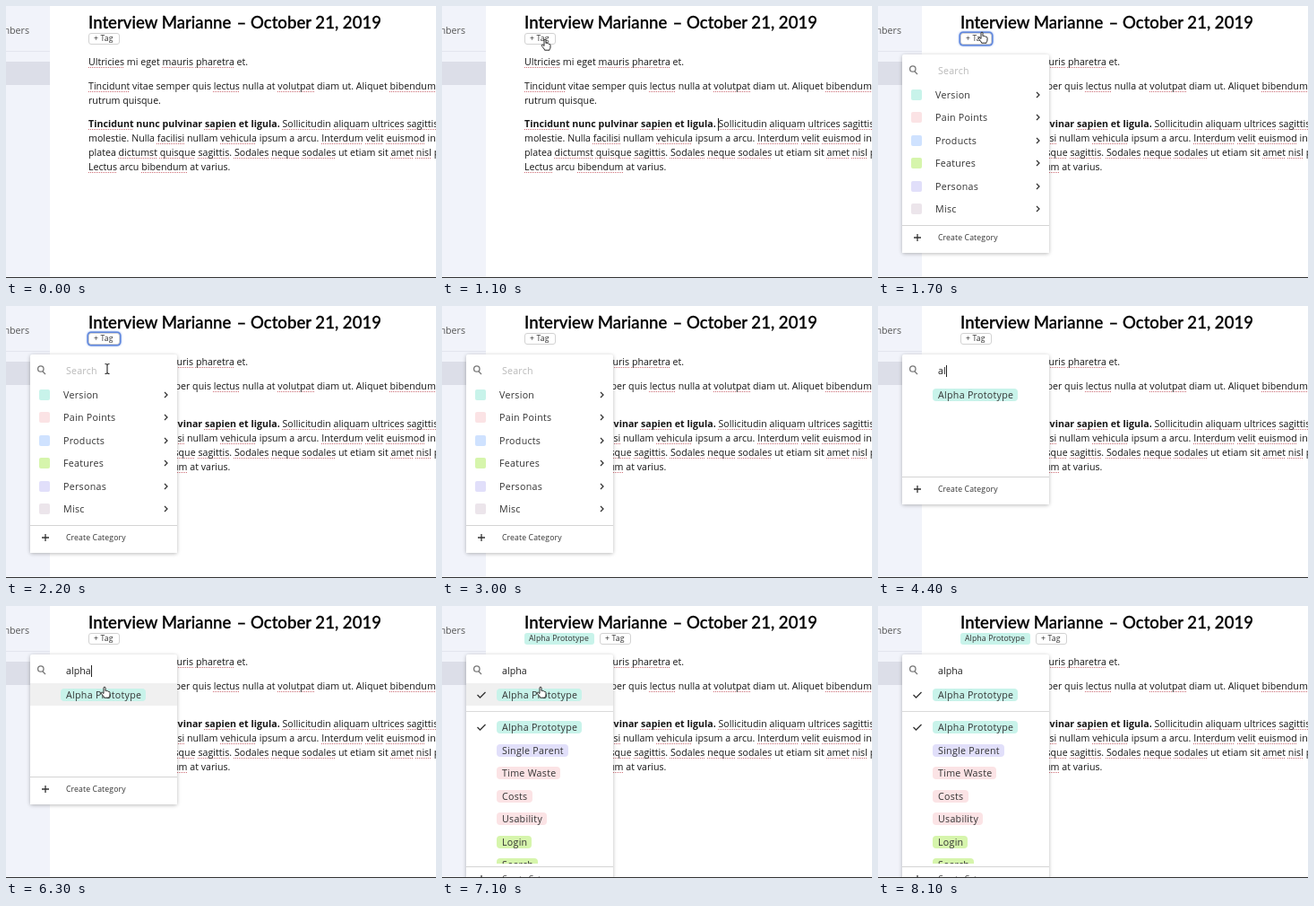
Write an HTML page that moves like this. It is 480x303 px and loops after 8.2 s.

```html
<!DOCTYPE html>
<html lang="en">
<head>
<meta charset="utf-8">
<title>Tagging a note</title>
<style>
  html, body { margin: 0; width: 100%; height: 100%; overflow: hidden; background: #fff; }
  body { position: relative; font: 10.667px/16px "Open Sans", sans-serif; color: #161616; }
  body *, .abs { position: absolute; white-space: nowrap; }
  u, b, i, .letter, #caret { position: static; }
  u { text-decoration: underline dotted #cf6f78 1.3px; text-underline-offset: 2px; text-decoration-skip-ink: none; }
  svg { overflow: visible; fill: none; stroke: #333; stroke-width: 1.3; }

  #side { left: 0; top: 0; width: 49px; height: 303px; background: #f1f3fa; color: #555; overflow: hidden; }
  #side .rule { top: 50px; width: 49px; height: 1px; background: #e3e5ee; }
  #side .item { top: 62px; width: 49px; height: 26px; background: #dcdee8; }
  #side .label { right: 23px; top: 19px; }
  #edge { left: 0; top: 302px; width: 480px; height: 1px; background: #333; }

  .title { top: 6px; font: 500 18.6px/24px Lato, sans-serif; color: #000; -webkit-text-stroke: .3px #000; }
  .small { font-size: 8.667px; letter-spacing: .13px; color: #333; }
  #tag, #button { top: 29.5px; height: 13.5px; line-height: 13px; border-radius: 3px; box-sizing: border-box; }
  #tag { left: 92px; width: 78px; padding-left: 5px; background: #c8f3ea; }
  #button { left: 92px; width: 34.5px; padding-left: 5px; border: 1px solid #d2d2d2; line-height: 11.5px; background: #fff; }

  #menu { left: 27px; top: 54px; width: 164px; height: 221px; background: #fff; border-radius: 2px;
          box-shadow: 0 1px 4px rgba(0, 0, 0, .28); }
  #clip { inset: 0; overflow: hidden; }
  #inner { left: -27px; top: -54px; width: 191px; height: 400px; }
  .panel { left: 0; top: 0; width: 191px; height: 287px; overflow: hidden; }
  .row, .chip { letter-spacing: .28px; color: #333; }
  .swatch { left: 37px; width: 12px; height: 12px; border-radius: 2px; }
  .chip { left: 61px; height: 14px; line-height: 14px; padding: 0 5px 0 6px; border-radius: 4px; }
  .line { left: 27px; width: 164px; height: 1px; background: #dadada; }
  #hover { left: 27px; top: 86px; width: 164px; height: 25px; background: #f0f0f0; }
  #hint { left: 67px; top: 64px; letter-spacing: .2px; color: #b9b9b9; }
  #query { left: 67px; top: 64px; height: 16px; color: #222; }
  .letter { font-size: 0; }
  #caret { display: inline-block; width: 1px; height: 13px; vertical-align: -3px; background: #222; }
  #foot { left: 0; bottom: 0; width: 164px; height: 30px; border-top: 1px solid #d4d4d4; background: #fff; }
  #foot span { left: 40px; top: 5px; }
  #textcaret { left: 308px; top: 125px; width: 1px; height: 14px; background: #222; }

  #cursor { left: 0; top: 0; transform: translate(468px, 246px); }
  #hand { fill: #fff; stroke: #111; stroke-width: .9; }
  #beam { stroke: #222; stroke-width: 1.1; }
  .off { visibility: hidden; }
</style>
</head>
<body>
<div id="side">
  <div class="label">Members</div><div class="rule"></div><div class="item"></div>
</div>
<div class="title" style="left:92px">Interview Marianne</div>
<div class="title" style="left:257.5px">– October 21, 2019</div>
<div id="tag" class="small off">Alpha Prototype</div>
<div id="button" class="small">+ Tag</div>
<div id="note"></div>
<div id="textcaret" class="off"></div>

<div id="menu" style="opacity:0">
  <div id="clip">
    <div id="inner">
      <svg style="left:0;top:0"><path stroke="#777" d="M41 73l3 3M42 70a3.2 3.2 0 1 1-6.4 0a3.2 3.2 0 1 1 6.4 0z"/></svg>
      <div id="hint">Search</div>
      <div id="query"></div>
      <div id="categories" class="panel"></div>
      <div id="broad" class="panel off"></div>
      <div id="hover" class="off"></div>
      <div id="match" class="panel off"></div>
      <div id="picked" class="panel off"></div>
    </div>
    <div id="foot">
      <svg style="left:17px;top:13px"><path d="M-4 0h8M0-4v8"/></svg>
      <span class="small">Create Category</span>
    </div>
  </div>
</div>
<div id="edge"></div>

<div id="cursor">
  <svg id="hand" class="off" width="1" height="1"><path d="M-2 1.5V-4.8a1 1 0 0 1 2 0V-1.4c.6-.6 1.7-.4 1.8.3.7-.4 1.6-.1 1.7.6.8-.3 1.5.1 1.5.9V3c0 1.6-1 2-1 3.2H-1.4C-1.6 4.6-3.6 3.2-4.6 1.4c-.6-1 .5-1.8 1.4-1z"/></svg>
  <svg id="beam" class="off" width="1" height="1"><path d="M-2.5-5.5Q0-5.5 0-4Q0-5.5 2.5-5.5M0-4V4M-2.5 5.5Q0 5.5 0 4Q0 5.5 2.5 5.5"/></svg>
</div>

<script>
const LOOP = 8200;
const MINT = '#c8f3ea', ROSE = '#fbe3e5', LILAC = '#e1dffa', LIME = '#d6f5ac';
const fill = (id, html) => { document.getElementById(id).innerHTML = html; };

// Note text: _word_ is a flagged word, *text* is bold.
const lines = [
  [62, '_Ultricies_ mi eget _mauris_ _pharetra_ et.'],
  [88.67, '_Tincidunt_ vitae semper quis _lectus_ nulla at _volutpat_ diam ut. Aliquet _bibendum_ enim'],
  [104.67, 'rutrum quisque.'],
  [131.33, '*_Tincidunt_ nunc pulvinar _sapien_ et ligula.* _Sollicitudin_ _aliquam_ _ultrices_ _sagittis_ orci'],
  [147.33, 'molestie. Nulla _facilisi_ nullam _vehicula_ ipsum a arcu. _Interdum_ _velit_ _euismod_ in'],
  [163.33, 'platea _dictumst_ _quisque_ _sagittis_. _Sodales_ _neque_ _sodales_ ut etiam sit _amet_ _nisl_ purus'],
  [179.33, '_Lectus_ arcu _bibendum_ at varius.']
];
fill('note', lines.map(([y, s]) => `<div style="left:92px;top:${y - 8}px">` +
  s.replace(/_(.+?)_/g, '<u>$1</u>').replace(/\*(.+?)\*/g, '<b>$1</b>') + '</div>').join(''));

const category = ([name, color], i) => {
  const y = 98.5 + 25.5 * i;
  return `<div class="swatch" style="top:${y - 6}px;background:${color}"></div>
    <div class="row" style="left:64px;top:${y - 8}px">${name}</div>
    <svg style="left:177px;top:${y}px"><path d="M0-3l3 3l-3 3"/></svg>`;
};
const chip = (name, color, y) => `<div class="chip" style="top:${y - 7}px;background:${color}">${name}</div>`;
const chips = (list, y) => list.map(([name, color], i) => chip(name, color, y + 25.5 * i)).join('');
const check = y => `<svg style="left:44px;top:${y}px"><path d="M-4.5 0l3 3l6-6"/></svg>`;

const tags = [['Alpha Prototype', MINT], ['Single Parent', LILAC], ['Time Waste', ROSE],
  ['Costs', ROSE], ['Usability', ROSE], ['Login', LIME], ['Search', LIME]];
fill('categories', [['Version', MINT], ['Pain Points', ROSE], ['Products', '#cfe2ff'],
  ['Features', LIME], ['Personas', LILAC], ['Misc', '#ece5eb']].map(category).join(''));
fill('broad', chips(tags.filter(([name]) => /a/i.test(name)), 98.5));
fill('match', chip('Alpha Prototype', MINT, 98.5));
fill('picked', check(99) + '<div class="line" style="top:117px"></div>' + check(135) + chips(tags, 135));
fill('query', [...'alpha'].map((c, i) => `<span class="letter" id="l${i}">${c}</span>`).join('') + '<span id="caret" class="off"></span>');

// Keyframes given in ms; each stop is [time, declaration, steps to the next stop].
let css = '';
const used = {};
function play(id, ...stops) {
  const n = used[id] = (used[id] || 0) + 1, name = `${id}-${n}`;
  const body = stops.map(([t, rule, steps = 1]) =>
    `${Math.max(0, t - 10) / LOOP * 100}%{${rule};animation-timing-function:steps(${steps})}`).join('');
  css += `@keyframes ${name}{${body}}#${id}{animation:${name} ${LOOP}ms step-end infinite}\n`;
}
// Flips visibility at each time, starting from hidden (or shown).
const toggle = (id, times, shown = false) => play(id, ...[0, ...times, LOOP + 10].map((t, i, all) => {
  const flips = i === all.length - 1 ? i - 1 : i;
  return [t, `visibility:${(flips % 2 === 1) !== shown ? 'inherit' : 'hidden'}`];
}));
const to = (x, y) => `transform:translate(${x}px,${y}px)`;

toggle('textcaret', [100, 600, 1100, 1200]);
toggle('caret', [2500, 3000, 3500, 4000, 4300, 5600, 6100, 6600]);
toggle('hint', [4300], true);
[4300, 4400, 4600, 4900, 5100].forEach((t, i) => play('l' + i, [0, 'font-size:0'],
  [t, 'font-size:10.667px'], [LOOP + 10, 'font-size:10.667px']));

toggle('categories', [4300], true);
toggle('broad', [4300, 4400]);
toggle('match', [4400]);
toggle('hover', [6200, 7800]);
toggle('picked', [7000]);
toggle('tag', [6900]);
play('menu', [0, 'opacity:0;height:221px'], [1300, 'opacity:.5;height:221px'], [1400, 'opacity:1;height:221px'],
  [4300, 'opacity:1;height:267px'], [4400, 'opacity:1;height:167px'], [7000, 'opacity:1;height:267px'],
  [LOOP + 10, 'opacity:1;height:267px']);

const ring = 'box-shadow:0 0 0 1.5px #5f86dc,0 0 2px 2px #a9c0f0;border-color:#d2d2d2';
const plain = 'box-shadow:none;border-color:#d2d2d2';
play('button', [0, plain + ';left:92px'], [1200, ring + ';left:92px'], [2500, plain + ';left:92px'],
  [6900, plain + ';left:176px'], [LOOP + 10, plain + ';left:176px']);

toggle('beam', [100, 800, 1900, 2600, 6000, 6200, 8000, 8100]);
toggle('hand', [800, 1900, 6200, 8000]);
play('cursor', [0, to(468, 246)], [100, to(468, 246), 3], [400, to(250, 130), 5], [900, to(116, 43)],
  [1300, to(116, 43), 3], [1600, to(118, 32), 2], [1800, to(116, 38), 4], [2200, to(113, 70)],
  [6000, to(113, 70), 3], [6300, to(111, 96)], [7800, to(111, 96), 3], [8100, to(330, 110)],
  [LOOP + 10, to(330, 110)]);

document.head.appendChild(document.createElement('style')).textContent = css;
</script>
</body>
</html>
```
